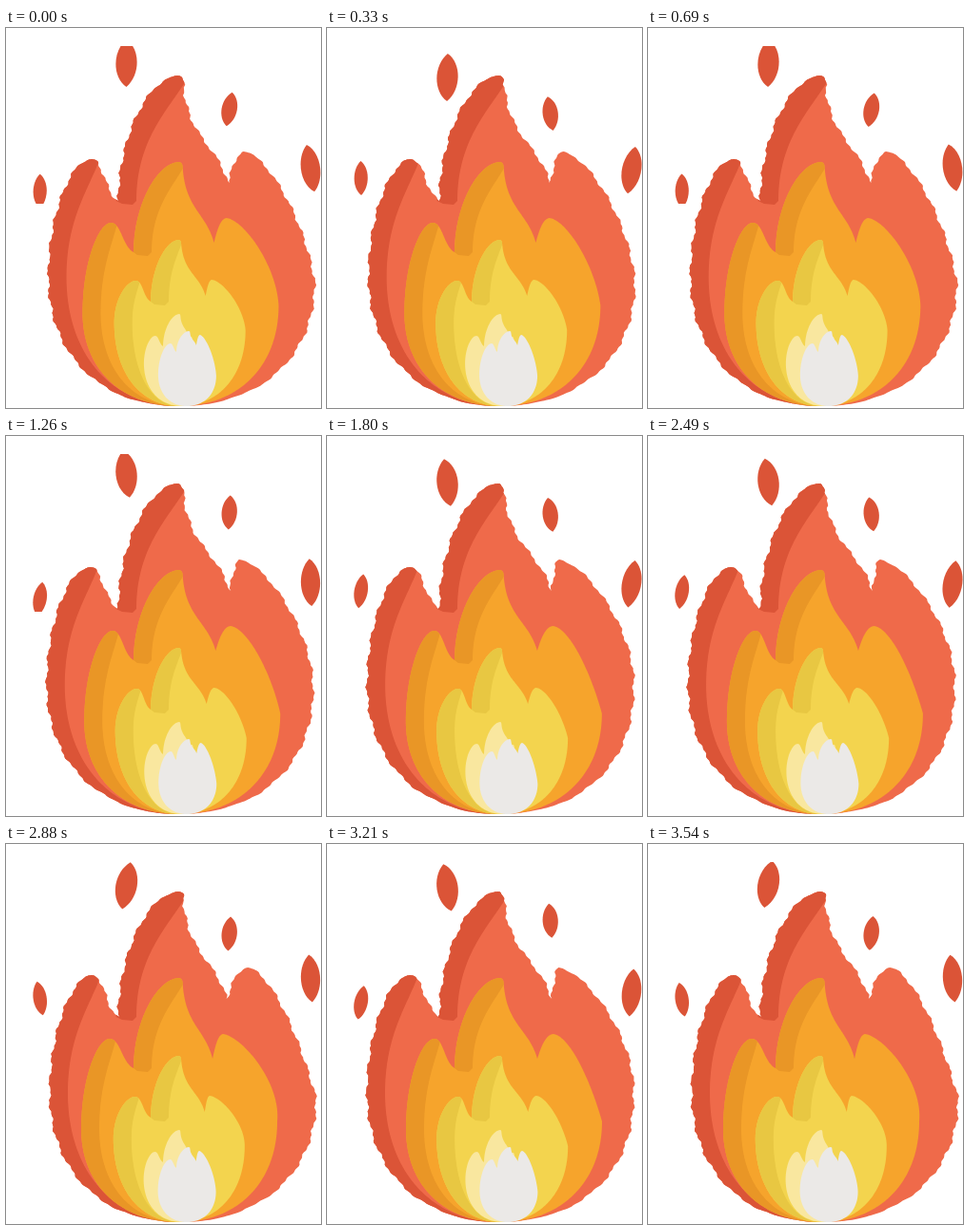
These frames come from a looping animation (331 by 400 pixels, 3570 ms). An HTML page with a canvas:

```html
<!DOCTYPE html>
<html>
<head>
<meta charset="utf-8">
<title>Fire</title>
<style>
html, body { margin: 0; overflow: hidden; background: #fff; }
canvas { display: block; }
</style>
</head>
<body>
<canvas width="331" height="400"></canvas>
<script>
const ctx = document.querySelector('canvas').getContext('2d');
const WIDTH = 331, HEIGHT = 400, LOOP = 3570, STEP = 30, SWING = 680;
const BAND = 19, BOB = 7.5, TILT = 10, EMBER = '#db5437';

// Each flame has three tongues: side peaks, valleys between, and widest points
const flames = [
  {
    fill: '#ef6a4a', dark: EMBER, rough: 1.2, lean: -5, base: [182, 398],
    left: [44, 262], leftPeak: [89, 138], leftValley: [118, 182], top: [180, 50],
    rightValley: [234, 163], rightPeak: [249, 130], right: [324, 268]
  },
  {
    fill: '#f6a42c', dark: '#e99626', rough: 0, lean: 5, base: [182, 398],
    left: [81, 300], leftPeak: [111, 205], leftValley: [134, 236], top: [181, 141],
    rightValley: [219, 226], rightPeak: [233, 200], right: [287, 292]
  },
  {
    fill: '#f3d44e', dark: '#e8c742', rough: 0, lean: 3, base: [182, 398],
    left: [114, 310], leftPeak: [137, 266], leftValley: [152, 288], top: [181, 223],
    rightValley: [210, 282], rightPeak: [217, 265], right: [252, 318]
  },
  {
    fill: '#f9e79f', rough: 0, lean: 1, base: [185, 398],
    left: [145, 353], leftPeak: [157, 324], leftValley: [165, 335], top: [182, 301],
    rightValley: [192, 325], rightPeak: [195, 325], right: [200, 360]
  },
  {
    fill: '#ebe9e7', rough: 0, lean: 1, base: [190, 398],
    left: [160, 365], leftPeak: [173, 332], leftValley: [179, 341], top: [192, 319],
    rightValley: [200, 334], rightPeak: [204, 323], right: [221, 366]
  }
];

// Centre, half size, phases of bobbing and tilting in degrees
const embers = [
  { x: 126.5, y: 44.5, w: 11, h: 25, bobAt: 180, tiltAt: 90 },
  { x: 35.7, y: 165, w: 7, h: 18, bobAt: 335, tiltAt: 270, bottom: 185 },
  { x: 234.7, y: 87.5, w: 8, h: 18, bobAt: 105, tiltAt: 20 },
  { x: 320, y: 149, w: 10, h: 25, bobAt: 260, tiltAt: 200 }
];

const rad = degrees => degrees * Math.PI / 180;
const shift = ([x, y], dx, dy = 0) => [x + dx, y + dy];

// Cubic curve whose handles are fractions of the way from one point to the other
function bend(from, to, handle1, handle2) {
  const steps = Math.ceil(Math.hypot(to[0] - from[0], to[1] - from[1]) / 2);
  return Array.from({ length: steps + 1 }, (_, i) => {
    const u = i / steps, v = 1 - u;
    return from.map((start, axis) => {
      const part = 3 * u * v * (v * handle1[axis] + u * handle2[axis]) + u ** 3;
      return start + (to[axis] - start) * part;
    });
  });
}

const belly = (base, side) => bend(base, side, [.6, 0], [1, .4]);
const climb = (valley, top) => bend(valley, top, [0, .5], [.5, .98]);

function trace(points, rough = 0, angle = 0) {
  const path = new Path2D();
  for (const [x, y] of points) {
    const ripple = Math.sin(.24 * y + angle) + .6 * Math.sin(.77 * y - angle);
    path.lineTo(x + rough * ripple, y);
  }
  path.closePath();
  return path;
}

function drawFlame(flame, angle) {
  const { fill, dark, rough, base, top, leftValley } = flame;
  const sway = -Math.sin(angle + rad(15));
  const lean = flame.lean * sway;
  const left = shift(flame.left, lean * .4);
  const leftPeak = shift(flame.leftPeak, lean * .4);
  const rightValley = shift(flame.rightValley, Math.abs(flame.lean) * sway * .4);
  const rightPeak = shift(flame.rightPeak, lean);
  const right = shift(flame.right, lean * .4);
  const tip = (right[0] - left[0]) * .023;
  const corner = shift(top, tip, tip * 1.5);

  const body = trace([
    ...belly(base, left),
    ...bend(left, leftPeak, [0, .55], [.55, 1]),
    ...bend(leftPeak, leftValley, [.45, 0], [.5, .8]),
    ...climb(leftValley, top),
    ...bend(top, corner, [.8, 0], [1, .4]),
    ...bend(corner, rightValley, [.1, .55], [.75, .6]),
    ...bend(rightValley, rightPeak, [.25, .5], [.5, .97]),
    ...bend(rightPeak, right, [.35, .03], [.92 - .03 * lean, .55]),
    ...belly(base, right).reverse()
  ], rough, angle);

  ctx.save();
  ctx.fillStyle = fill;
  ctx.fill(body);
  if (dark) {
    const inner = shift(left, BAND), foot = shift(leftValley, BAND);
    const peakEdge = shift(leftPeak, tip * 1.5, -2);
    ctx.clip(body);
    ctx.fillStyle = dark;
    ctx.fill(trace([
      ...belly(base, inner),
      ...bend(inner, peakEdge, [0, .5], [.7, .75]),
      [0, peakEdge[1]], [0, base[1]]
    ]));
    ctx.fill(trace([
      ...climb(shift(leftValley, -rough * 2), shift(top, 0, -3)),
      shift(corner, 3, -tip),
      ...bend(corner, foot, [.4, .25], [1, .5]),
      shift(foot, -4, 4), shift(leftValley, 4, 3)
    ]));
  }
  ctx.restore();
}

function drawEmber({ x, y, w, h, bobAt, tiltAt, bottom = HEIGHT }, angle) {
  ctx.save();
  ctx.beginPath();
  ctx.rect(0, 19, WIDTH, bottom - 19);
  ctx.clip();
  ctx.translate(x, y + BOB * Math.cos(angle - rad(bobAt)));
  ctx.rotate(rad(TILT) * Math.cos(angle - rad(tiltAt)));
  ctx.beginPath();
  ctx.moveTo(0, -h);
  for (const side of [1, -1]) {
    ctx.bezierCurveTo(w * 1.35 * side, -h * .6 * side, w * 1.35 * side, h * .5 * side, 0, h * side);
  }
  ctx.fillStyle = EMBER;
  ctx.fill();
  ctx.restore();
}

function draw() {
  const time = Math.floor(performance.now() % LOOP / STEP) * STEP;
  const angle = 2 * Math.PI * time / SWING;
  ctx.fillStyle = '#fff';
  ctx.fillRect(0, 0, WIDTH, HEIGHT);
  for (const flame of flames) drawFlame(flame, angle);
  for (const ember of embers) drawEmber(ember, angle);
  requestAnimationFrame(draw);
}
draw();
</script>
</body>
</html>
```
